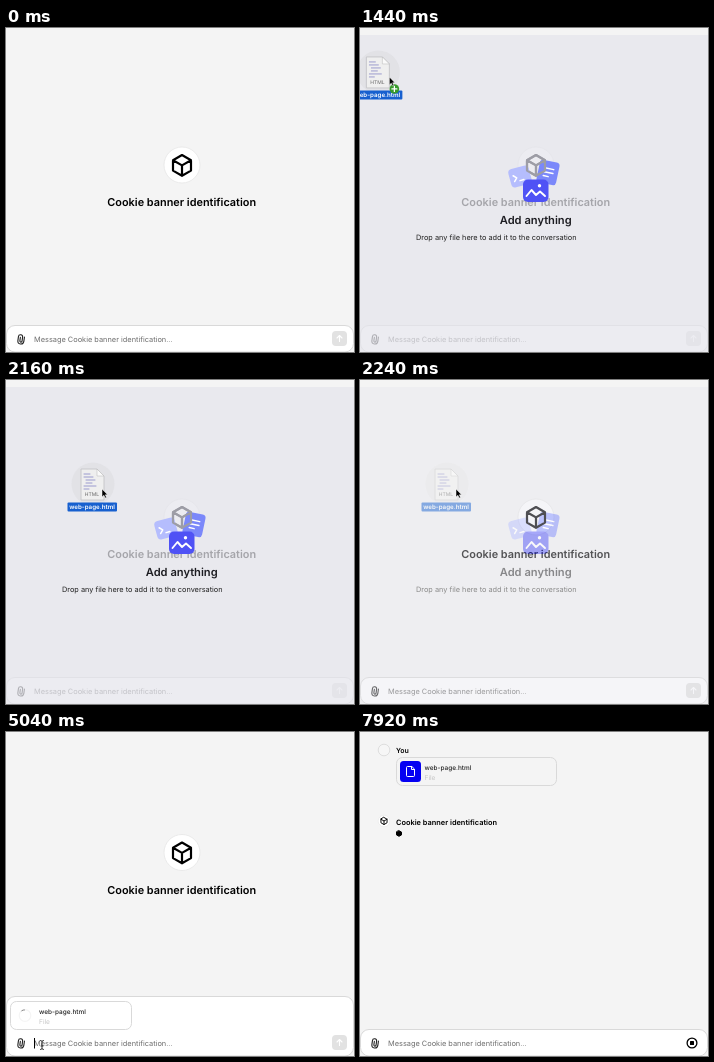
Animation of 348 by 324 pixels, one loop 8000 ms. Source, as an HTML page:

```html
<!DOCTYPE html>
<html lang="en">
<head>
<meta charset="utf-8">
<style>
html, body { margin: 0; height: 100%; overflow: hidden; background: #f4f4f4; }
svg { display: block; width: 100vw; height: 100vh; font-family: Inter, Roboto, sans-serif; text-rendering: geometricPrecision; }
.b { font-weight: 600; }
.line { fill: none; stroke: currentColor; stroke-linecap: round; stroke-linejoin: round; }
.box { fill: #fff; stroke: #d9d9d9; }
.file { font-size: 6.45px; font-weight: 500; fill: #222; }
.type { font-size: 6.6px; fill: #c6c6c6; }
</style>
</head>
<body>
<svg viewBox="0 0 348 324">
  <defs>
    <path id="cube" class="line" d="M0-10.4 9-5.2V5.2L0 10.4-9 5.2V-5.2ZM-9-5.2 0 0 9-5.2M0 0V10.4"/>
  </defs>

  <g id="cover">
    <circle cx="176" cy="137" r="18" fill="#fff" stroke="#e6e6e6" stroke-width=".8"/>
    <use href="#cube" x="176" y="137.4" stroke-width="2.2"/>
    <text class="b" x="175.700" y="178" font-size="10.900" text-anchor="middle">Cookie banner identification</text>
  </g>

  <g id="chat">
    <circle cx="24" cy="18" r="5.800" fill="#f6f6f6" stroke="#dedede"/>
    <text class="b" x="36" y="20.500" font-size="7">You</text>
    <rect class="box" x="36.500" y="25.500" width="160" height="28" rx="6" style="fill:#f4f4f4"/>
    <rect x="40" y="29" width="21" height="21" rx="3.500" fill="#0500f2"/>
    <path class="line" color="#fff" d="M51.500 34.500H47.500Q46.500 34.500 46.500 35.500V43.500Q46.500 44.500 47.500 44.500H53.500Q54.500 44.500 54.500 43.500V37.500ZV37.500H54.500"/>
    <text class="file" x="64.500" y="37.500">web-page.html</text>
    <text class="type" x="64.500" y="47.500">File</text>
  </g>
  <g id="reply">
    <circle cx="24" cy="89" r="5.800" fill="#fff" stroke="#e8e8e8" stroke-width=".6"/>
    <use href="#cube" transform="translate(24 89) scale(.34)" stroke-width="2.800"/>
    <text class="b" x="36" y="92.500" font-size="7.400">Cookie banner identification</text>
  </g>
  <path id="dot" class="line" style="fill:#000" d="M0-2.800 2.500-1.400V1.400L0 2.800-2.500 1.400V-1.400Z"/>

  <rect id="composer" class="box" x=".5" rx="8.500" width="347"/>
  <path class="line" color="#222" stroke-width="1.100" transform="rotate(8 15 312)" d="M18 308.500V313A3 3 0 0 1 12 313V309A2.100 2.100 0 0 1 16.200 309V313A1.100 1.100 0 0 1 14 313V309.500"/>
  <text x="28" y="314" font-size="7.400" fill="#6e6e6e">Message Cookie banner identification...</text>
  <rect id="caret" x="28" y="306" width="1" height="10.500"/>
  <g id="send">
    <rect x="326" y="303" width="15" height="15" rx="4"/>
    <path class="line" color="#fff" stroke-width="1.100" d="M333.500 313.500V307.500M331 310 333.500 307.500 336 310"/>
  </g>
  <g id="stop">
    <circle cx="332" cy="311" r="4.900" fill="none" stroke="#000" stroke-width="1.300"/>
    <rect x="330" y="309" width="4" height="4" rx=".5"/>
  </g>

  <g id="card">
    <rect class="box" x="4.500" y="269.500" width="121" height="28" rx="6"/>
    <circle id="ring" cx="19" cy="283.500" r="5.800" fill="none" stroke="#b4b4b4" stroke-width="1.200" stroke-dasharray="33 4" stroke-dashoffset="4"/>
    <g id="wait">
      <circle cx="19" cy="283.500" r="5.800" fill="none" stroke="#f5f5f5" stroke-width="1.200"/>
      <path class="line" color="#888" d="M15.800 278.700Q17.200 277.700 18.500 277.900"/>
    </g>
    <g id="done">
      <rect x="8.500" y="273" width="21" height="21" rx="3.500" fill="#0500f2"/>
      <path class="line" color="#fff" d="M20 278.500H15V288.500H23V281.500ZV281.500H23"/>
    </g>
    <text class="file" x="33" y="281.500">web-page.html</text>
    <text class="type" x="33" y="291.500">File</text>
    <g id="close">
      <circle cx="123.500" cy="271" r="5.200" fill="#777783"/>
      <path class="line" color="#fff" d="M121.600 269.100 125.400 272.900M125.400 269.100 121.600 272.900"/>
    </g>
  </g>

  <g id="drop">
    <rect y="7" width="348" height="317" fill="#e5e5ec" fill-opacity=".72"/>
    <g transform="translate(160 148.500) rotate(-15)">
      <rect x="-10.500" y="-9.500" width="21" height="19" rx="4" fill="#b5bdfd"/>
      <path class="line" color="#fff" stroke-width="1.500" d="M-6.500-2.500-3.500.500-6.500 3.500M-1 4H3"/>
    </g>
    <g transform="translate(188 144.500) rotate(12)">
      <rect x="-10" y="-11.500" width="20" height="23" rx="3.500" fill="#7b88fa"/>
      <path class="line" color="#fff" stroke-width="1.500" d="M-4-4H5M-4 0H5M-4 4H1"/>
    </g>
    <use href="#cube" x="176" y="137.400" stroke-width="2.200" color="#9d9da6"/>
    <rect x="163" y="151.500" width="25.500" height="22.500" rx="5" fill="#4f52f5"/>
    <path class="line" color="#fff" stroke-width="1.900" d="M166.500 168 171.500 162 176 167 180 163.500 185 168"/>
    <circle cx="179.500" cy="157.800" r="1.700" fill="#fff"/>
    <text class="b" x="175.700" y="195.500" font-size="11.150" text-anchor="middle" fill="#1d1d22">Add anything</text>
    <text x="56" y="212" font-size="7.350" fill="#222">Drop any file here to add it to the conversation</text>
    <g id="drag">
      <circle cx="1" r="21.500" fill="#dedee2" opacity=".6"/>
      <path d="M-11-15H5L12-8V16H-11Z" fill="#efefef" stroke="#c4c4c8" stroke-width=".9"/>
      <path d="M5-15V-8H12Z" fill="#fafafa" stroke="#b5b5b5" stroke-width=".5"/>
      <path class="line" color="#8585c4" stroke-width=".8" d="M-8-10H-2M-8-7H1M-6-4H3M-6-1H0M-8 2H4M-8 5H-3"/>
      <text y="12" font-size="5" fill="#666" text-anchor="middle">HTML</text>
      <rect x="-24.500" y="18.500" width="49.500" height="9" rx="1" fill="#1760cf"/>
      <text class="b" y="25.200" font-size="6.200" fill="#fff" text-anchor="middle">web-page.html</text>
      <g id="plus">
        <circle cx="17" cy="17" r="4.800" fill="#37992b"/>
        <path class="line" color="#fff" stroke-width="1.300" d="M14.500 17H19.500M17 14.500V19.500"/>
      </g>
    </g>
  </g>

  <path id="arrow" d="M0 0V8L1.900 6.300 3.200 9 4.500 8.400 3.300 5.800H5.600Z" stroke="#fff" stroke-width=".5"/>
  <path id="beam" class="line" color="#222" stroke-width=".9" d="M-1.500-4.500Q0-4.500 0-3.500Q0-4.500 1.500-4.500M0-3.500V3.500M-1.500 4.500Q0 4.500 0 3.500Q0 4.500 1.500 4.500M-1 1H1"/>
</svg>
<script>
const LOOP = 8000, STEP = 80;
const BLINKS = [3760, 4400, 4960, 5600, 6160, 6800];
const el = id => document.getElementById(id);
const show = (id, on) => { el(id).style.display = on ? '' : 'none'; };
const move = (id, x, y, s = 1) => el(id).setAttribute('transform', `translate(${x} ${y}) scale(${s})`);
const part = (t, a, b) => Math.min(1, Math.max(0, (t - a) / (b - a)));
const mix = (a, b, k) => a + (b - a) * k;
const easeOut = (k, n) => 1 - (1 - k) ** n;

function pointer(t, file) {
  if (t < 2240) return [file[0] + 12 - 2 * part(t, 1440, 2160), file[1] + 5];
  if (t < 6960) {
    const k = part(t, 2800, 3600);
    return [mix(96, 36, k ** 1.4), mix(109, 313, easeOut(k, 2.6))];
  }
  const k = part(t, 6880, 7360);
  return [mix(36, 332, k * k * (3 - 2 * k)), 313];
}

function draw(t) {
  const loaded = t >= 2320 && t < 7440, sent = t >= 7440;
  const k = easeOut(part(t, 1360, 2160), 2.36);
  const file = [mix(-2, 86, k), mix(27, 104, k)];
  const [x, y] = pointer(t, file);

  show('cover', !sent);
  move('cover', 0, loaded ? -16.5 : 0);
  const top = loaded ? 264.5 : 297.5;
  el('composer').setAttribute('y', top);
  el('composer').setAttribute('height', 324 - top);

  show('drop', t >= 1360 && t < 2320);
  el('drop').style.opacity = t < 2240 ? 1 : .5;
  move('drag', ...file);
  show('plus', t < 2080);

  show('card', loaded);
  show('ring', t < 3360);
  show('wait', t >= 3360 && t < 6960);
  show('done', t >= 6960);
  show('close', y > 268 && y < 300);
  show('caret', BLINKS.filter(b => b <= t).length % 2);

  const answering = t >= 7680;
  show('send', !answering);
  el('send').setAttribute('fill', t >= 6960 && !sent ? '#000' : '#e2e2e2');
  show('stop', answering);
  show('chat', answering);
  show('reply', t >= 7760);
  show('dot', t >= 7840);
  move('dot', 39, 101.5, t < 7920 ? .8 : 1);

  const typing = y > 266 && x < 300;
  const live = t >= 1360 && !sent;
  show('arrow', live && !typing);
  show('beam', live && typing);
  move('arrow', x, y);
  move('beam', x, y);
}

const start = performance.now();
function tick() {
  const t = (performance.now() - start) % LOOP;
  draw(Math.floor(t / STEP) * STEP);
  requestAnimationFrame(tick);
}
tick();
</script>
</body>
</html>
```
